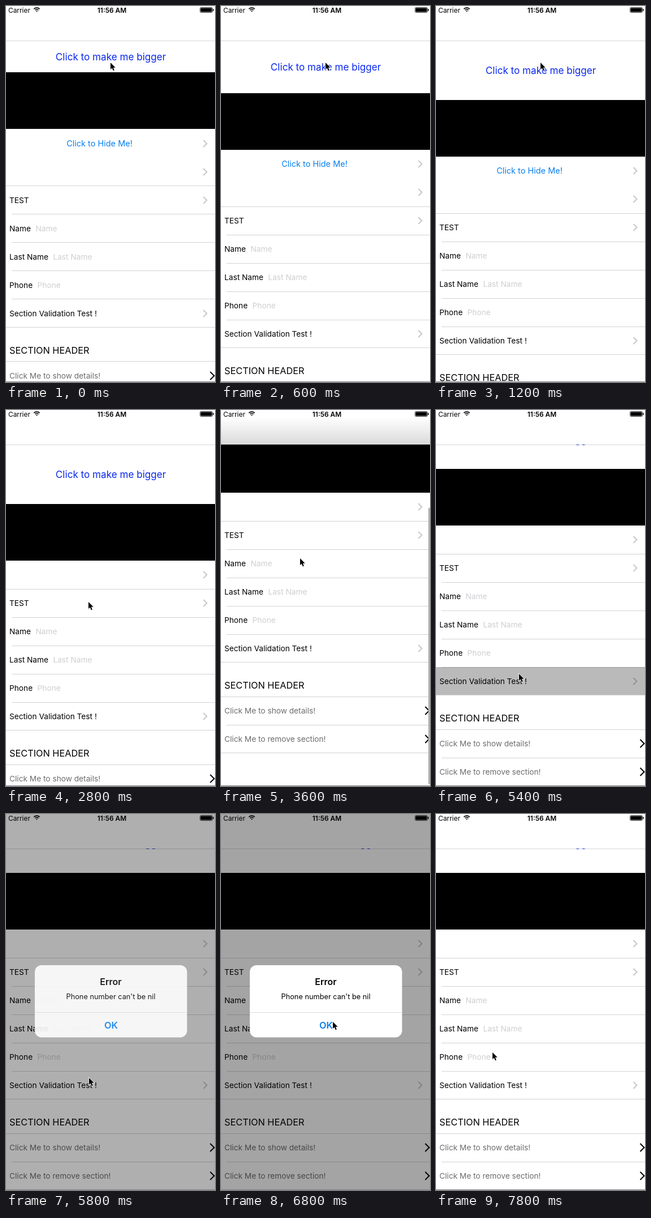
Recreate the animation shown at these times as an HTML page with a canvas. Size 370 by 664 pixels, loop 8000 ms.

```html
<!DOCTYPE html>
<html lang="en">
<head>
<meta charset="utf-8">
<title>Form demo</title>
<style>
  html, body { margin: 0; width: 100%; height: 100%; overflow: hidden; background: #fff; }
  canvas { display: block; width: 370px; height: 664px; }
</style>
</head>
<body>
<canvas id="stage" width="370" height="664"></canvas>
<script>
const W = 370, H = 664, NAV = 61, ROW = 50, SECTION_ROW = 49.35;
const LOOP = 8000, STEP = 200, GLIDE = 600;
const TINT = '#0a7fee', BODY = 13.7;
const ctx = document.getElementById('stage').getContext('2d');

// Where the pointer comes to rest, and when it arrives there
const pointerStops = [
  { time: 0, x: 185, y: 100 },
  { time: 2200, x: 155, y: 296 },
  { time: 2800, x: 146, y: 339 },
  { time: 3600, x: 140, y: 262 },
  { time: 5000, x: 147, y: 466 },
  { time: 6600, x: 198, y: 367 },
  { time: 7600, x: 100, y: 421 }
];

const ramp = (t, start, duration) => Math.min(1, Math.max(0, (t - start) / duration));
const easeOut = p => 1 - (1 - p) ** 2;
const easeInOut = p => p * p * (3 - 2 * p);

function pointerAt(t) {
  let { x, y } = pointerStops[0];
  for (const stop of pointerStops) {
    const p = easeInOut(ramp(t, stop.time - GLIDE, GLIDE));
    x += (stop.x - x) * p;
    y += (stop.y - y) * p;
  }
  return { x, y };
}

function stateAt(t) {
  return {
    grow: easeOut(ramp(t, 400, 400)),
    hide: ramp(t, 2400, 400),
    // Pull past the end, then spring back
    scroll: 120 * easeOut(ramp(t, 2800, 800)) - 58 * easeOut(ramp(t, 3600, 800)),
    scrollbar: ramp(t, 2800, 200) - ramp(t, 4400, 400),
    press: ramp(t, 5000, 200) - ramp(t, 5600, 200),
    alert: easeOut(ramp(t, 5400, 600)) - easeOut(ramp(t, 6800, 400)),
    pointer: pointerAt(t)
  };
}

function rect(x, y, w, h, color) {
  ctx.fillStyle = color;
  ctx.fillRect(x, y, w, h);
}

function roundRect(x, y, w, h, r, color) {
  ctx.fillStyle = color;
  ctx.beginPath();
  ctx.roundRect(x, y, w, h, r);
  ctx.fill();
}

function text(s, x, y, size, color = '#000', align = 'left', weight = 400) {
  ctx.font = `${weight} ${size}px Inter, Roboto, sans-serif`;
  ctx.textAlign = align;
  ctx.fillStyle = color;
  ctx.fillText(s, x, Math.round(y));
}

function chevron(top, x, size, color) {
  const y = Math.round(top + 25);
  ctx.beginPath();
  ctx.moveTo(x, y - size);
  ctx.lineTo(x + size, y);
  ctx.lineTo(x, y + size);
  ctx.lineWidth = 2;
  ctx.strokeStyle = color;
  ctx.stroke();
}

const disclosure = top => chevron(top, 349.5, 6, '#c7c7cc');
const separator = (y, x = 0) => rect(x, Math.floor(y), W - x, 1, '#d3d3d6');
const rowText = (s, top, color, x = 6) => text(s, x, top + 30, BODY, color);

function drawForm({ grow, hide, scroll, press }, blackTop) {
  let y = blackTop;
  text('Click to make me bigger', 185.5, (62 - scroll + y) / 2 + 6.3, 17.1, '#0a28ee', 'center');
  rect(0, Math.floor(y), W, 100, '#000');
  y += 100;

  if (hide < 1) {
    ctx.globalAlpha = 1 - hide;
    text('Click to Hide Me!', 165.5, y + 30, 14.5, TINT, 'center');
    disclosure(y);
    ctx.globalAlpha = 1;
    y += ROW * (1 - hide);
  }

  disclosure(y);
  separator(y += ROW);
  rowText('TEST', y);
  disclosure(y);
  separator(y += ROW, 10);

  for (const label of ['Name', 'Last Name', 'Phone']) {
    rowText(label, y);
    rowText(label, y, '#cfcfd3', 14.5 + ctx.measureText(label).width);
    separator(y += ROW, 10);
  }

  rowText('Section Validation Test !', y);
  disclosure(y);
  rect(0, Math.floor(y), W, ROW, `rgba(0,0,0,${0.27 * press})`);
  separator(y += SECTION_ROW);

  text('SECTION HEADER', 6, y + 46.8, 16.3);
  separator(y += 60.4);
  for (const [action, height, inset] of [['show details', ROW, 10], ['remove section', SECTION_ROW, 0]]) {
    rowText(`Click Me to ${action}!`, y, '#6c6c6c');
    chevron(y, 361.5, 7, '#000');
    separator(y += height, inset);
  }
}

function drawStatusBar() {
  text('Carrier', 4, 12, 11.9);
  text('11:56 AM', 187.5, 12, 11.9, '#000', 'center', 600);

  ctx.strokeStyle = '#000';
  ctx.lineWidth = 1.7;
  for (let i = 0; i < 3; i++) {
    ctx.beginPath();
    ctx.arc(54.5, 10.5, 1.2 + 3.1 * i, -Math.PI * 0.75, -Math.PI * 0.25);
    ctx.stroke();
  }

  ctx.lineWidth = 0.7;
  ctx.beginPath();
  ctx.roundRect(343.5, 2.5, 22, 9, 2);
  ctx.stroke();
  roundRect(344.5, 3.5, 20, 7, 1, '#000');
  roundRect(366.3, 5, 1.5, 4, 1, '#000');
}

function drawNav(blackTop) {
  rect(0, 0, W, NAV, '#fff');
  const shade = 0.15 * ramp(NAV - blackTop, 0, 15);
  const blur = ctx.createLinearGradient(0, 12, 0, NAV);
  blur.addColorStop(0, 'rgba(0,0,0,0)');
  blur.addColorStop(1, `rgba(0,0,0,${shade})`);
  rect(0, 12, W, NAV - 12, blur);
  rect(0, NAV, W, 1, 'rgba(0,0,0,0.16)');
  drawStatusBar();
}

function drawScrollbar(scroll, alpha) {
  const top = NAV + scroll * 0.93;
  ctx.globalAlpha = alpha;
  roundRect(367, top, 3, Math.min(661, top + 545) - top, 1.5, '#b2b2b2');
  ctx.globalAlpha = 1;
}

function drawAlert(amount) {
  rect(0, 0, W, H, `rgba(0,0,0,${0.355 * amount})`);
  ctx.globalAlpha = amount;
  roundRect(51, 267, 269.5, 127.5, 12, '#fff');
  text('Error', 185.5, 302, 16, '#000', 'center', 600);
  text("Phone number can't be nil", 185.5, 327, 12.75, '#000', 'center');
  rect(51, 350, 269.5, 1, '#dcdcdc');
  text('OK', 186, 379, 16.4, TINT, 'center', 600);
  ctx.globalAlpha = 1;
}

function drawPointer({ x, y }) {
  const arrow = new Path2D('M0 0V12L2.8 9.5L4.8 14.2L6.8 13.4L4.9 8.8H8.7Z');
  ctx.save();
  ctx.translate(x, y);
  ctx.lineWidth = 1.5;
  ctx.strokeStyle = '#fff';
  ctx.stroke(arrow);
  ctx.fillStyle = '#000';
  ctx.fill(arrow);
  ctx.restore();
}

function draw(now) {
  const state = stateAt(Math.floor(now % LOOP / STEP) * STEP);
  const blackTop = 117.9 + 48.4 * state.grow - state.scroll;

  rect(0, 0, W, H, '#fff');
  drawForm(state, blackTop);
  drawNav(blackTop);
  drawScrollbar(state.scroll, state.scrollbar);
  drawAlert(state.alert);
  rect(0, H - 1, W, 1, '#808080');
  drawPointer(state.pointer);
}

const start = performance.now();
function tick() {
  draw(performance.now() - start);
  requestAnimationFrame(tick);
}
tick();
</script>
</body>
</html>
```
